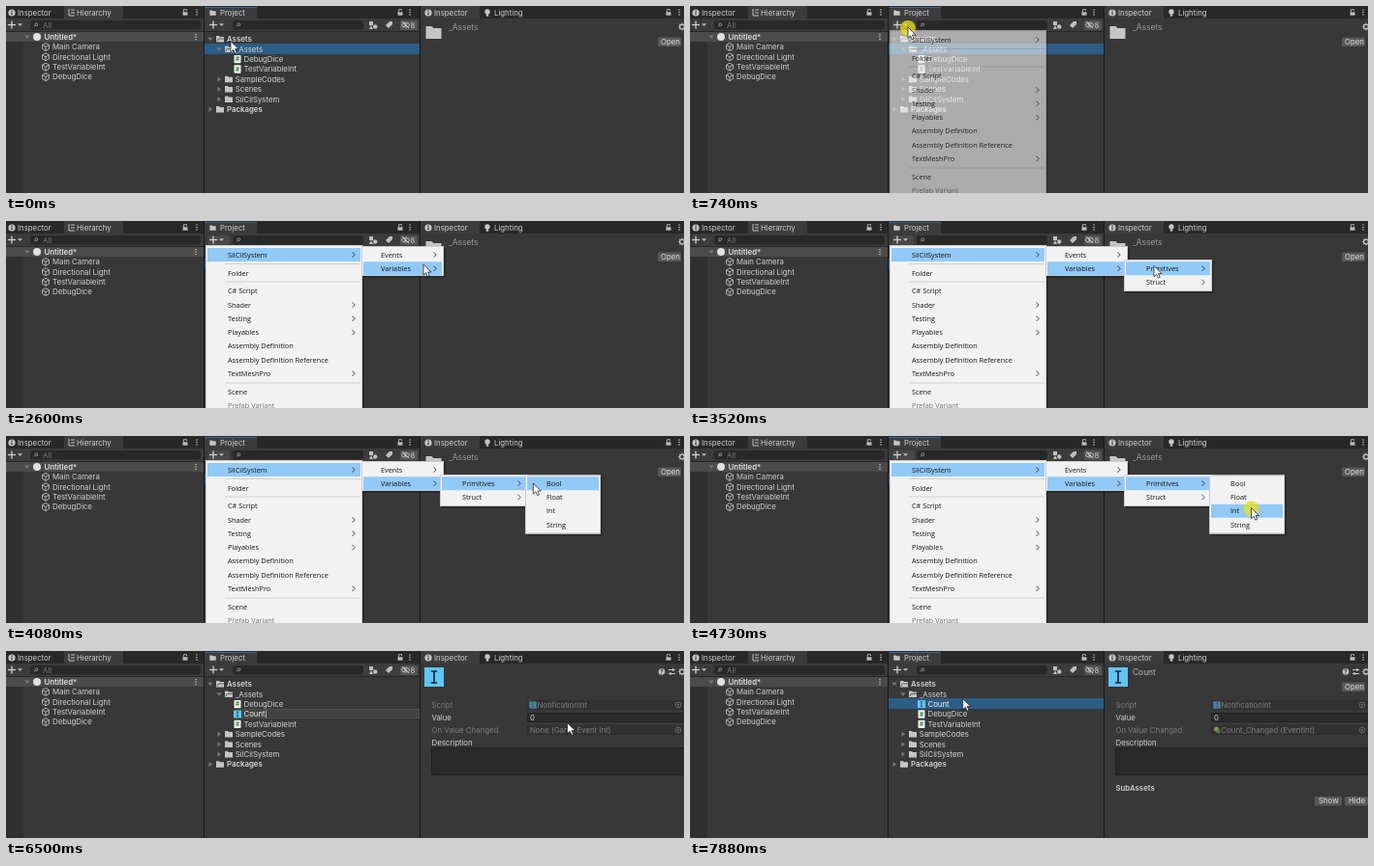
Write an HTML page with a canvas that moves like this. It is 700 px wide and 194 px high and loops after 8000 ms.

```html
<!DOCTYPE html>
<html lang="en">
<head>
<meta charset="utf-8">
<title>Creating a variable asset</title>
<style>
html, body { margin: 0; width: 100%; height: 100%; overflow: hidden; background: #383838; }
canvas { display: block; width: 700px; height: 194px; }
</style>
</head>
<body>
<canvas id="stage" width="700" height="194"></canvas>
<script>
const LOOP = 8000;
const UI = 'Inter, sans-serif';
const MENU = '"Open Sans", sans-serif';
const INK = '#d0d0d0';
const DIM = '#7c7c7c';
const screen = document.getElementById('stage').getContext('2d');
const layer = document.createElement('canvas');
layer.width = 700;
layer.height = 194;
const layerCtx = layer.getContext('2d');
let g = screen;

function box(x, y, w, h, color, radius = 0) {
  g.fillStyle = color;
  g.beginPath();
  g.roundRect(x, y, w, h, radius);
  g.fill();
}

function frame(x, y, w, h, color, radius = 0) {
  g.strokeStyle = color;
  g.lineWidth = 1;
  g.beginPath();
  g.roundRect(x + .5, y + .5, w - 1, h - 1, radius);
  g.stroke();
}

function text(str, x, y, color = INK, size = 7.8, weight = 400, family = UI) {
  g.font = `${weight} ${size}px ${family}`;
  g.textBaseline = 'alphabetic';
  g.fillStyle = color;
  g.fillText(str, x, y + size * .36);
}

function poly(points, color, filled = true, width = 1) {
  g.beginPath();
  points.forEach(([x, y], i) => i ? g.lineTo(x, y) : g.moveTo(x, y));
  if (filled) {
    g.fillStyle = color;
    g.fill();
  } else {
    g.strokeStyle = color;
    g.lineWidth = width;
    g.stroke();
  }
}

function disc(x, y, r, color) {
  g.fillStyle = color;
  g.beginPath();
  g.arc(x, y, r, 0, Math.PI * 2);
  g.fill();
}

function ring(x, y, r, color, width = .9) {
  g.strokeStyle = color;
  g.lineWidth = width;
  g.beginPath();
  g.arc(x, y, r, 0, Math.PI * 2);
  g.stroke();
}

function foldout(x, y, open) {
  poly(open ? [[x - 2.8, y - 1.5], [x + 2.8, y - 1.5], [x, y + 2]]
            : [[x - 1.5, y - 2.8], [x - 1.5, y + 2.8], [x + 2, y]], '#777');
}

function folder(x, y, s = 1, open = false) {
  poly([[x - 4 * s, y - 3.2 * s], [x - s, y - 3.2 * s], [x, y - 2.2 * s], [x + 4 * s, y - 2.2 * s],
        [x + 4 * s, y + 3.3 * s], [x - 4 * s, y + 3.3 * s]], '#c5c5c5');
  if (open) poly([[x - 3, y + 2.5], [x - 1.8, y - .3], [x + 4, y - .3]], '#484848', false, .8);
}

function cube(x, y) {
  const hex = Array.from({ length: 7 }, (_, i) => {
    const a = Math.PI / 6 + i * Math.PI / 3;
    return [x + 4 * Math.cos(a), y + 4 * Math.sin(a)];
  });
  poly(hex, '#c0c0c0', false, .9);
  poly([[x - 3.4, y - 2], [x, y], [x + 3.4, y - 2]], '#c0c0c0', false, .9);
  poly([[x, y], [x, y + 4]], '#c0c0c0', false, .9);
}

function scriptIcon(x, y) {
  box(x - 3.5, y - 4.2, 7, 8.4, '#f2f2f2', .8);
  text('#', x - 2, y, '#218a3a', 6.2, 700);
}

function intIcon(x, y, s, alpha = 1) {
  g.globalAlpha = alpha;
  box(x - s / 2, y - s / 2, s, s, '#62c5f7');
  const h = s * .3, w = s * .16;
  for (const side of [-h, h]) poly([[x - w, y + side], [x + w, y + side]], '#10202a', false, s * .07);
  poly([[x, y - h], [x, y + h]], '#10202a', false, s * .08);
  g.globalAlpha = 1;
}

function dots(x, y) {
  for (const d of [-2.5, 0, 2.5]) disc(x, y + d, .8, '#c0c0c0');
}

function lock(x, y) {
  box(x - 2.5, y - .2, 5, 3.4, '#bdbdbd');
  poly([[x - 1.6, y], [x - 1.6, y - 2.8], [x + 1.5, y - 2.8], [x + 1.5, y - 1.4]], '#bdbdbd', false, .9);
}

function infoIcon(x, y) {
  disc(x, y, 3.6, '#c6c6c6');
  box(x - .6, y - .6, 1.2, 2.8, '#333');
  box(x - .6, y - 2.4, 1.2, 1.1, '#333');
}

function search(x, y, w) {
  box(x, y, w, 9.5, '#282828', 3);
  ring(x + 6.3, y + 4.2, 1.4, '#aaa', .8);
  poly([[x + 5.3, y + 5.2], [x + 4, y + 6.5]], '#aaa', false, .8);
}

function addButton(x, y) {
  poly([[x - 4, y], [x + 4, y]], '#d0d0d0', false, 1.3);
  poly([[x, y - 4], [x, y + 4]], '#d0d0d0', false, 1.3);
  poly([[x + 6, y - 1.2], [x + 11, y - 1.2], [x + 8.5, y + 1.6]], '#bbb');
}

function gear(x, y) {
  ring(x, y, 2.4, '#c4c4c4', 1.3);
  for (let i = 0; i < 8; i++) {
    const a = i * Math.PI / 4;
    disc(x + 3.3 * Math.cos(a), y + 3.3 * Math.sin(a), .6, '#c4c4c4');
  }
}

function button(label, x, y, w, tx) {
  box(x, y, w, 9.5, '#585858', 1.5);
  text(label, tx, y + 4.6, '#e0e0e0');
}

function drawHierarchy() {
  box(0, 0, 204, 13, '#282828');
  box(60, 0, 61, 13, '#3c3c3c');
  infoIcon(6, 7);
  text('Inspector', 12, 7);
  poly([[65, 3], [65, 10], [67, 10]], '#c0c0c0', false);
  for (const y of [4, 7, 10]) poly([[67, y], [71, y]], '#c0c0c0', false);
  text('Hierarchy', 73, 7);
  lock(185, 6.5);
  dots(197, 6.5);
  box(0, 13, 204, 13, '#3c3c3c');
  addButton(6, 19.5);
  search(25, 15, 176);
  text('All', 38, 19.8, '#777');
  box(0, 26, 204, 1, '#272727');
  box(0, 27, 18, 167, '#303030');
  box(0, 27, 204, 10, '#4b4b4b');
  foldout(22, 32, true);
  disc(32, 32, 4, '#e0e0e0');
  text('Untitled*', 39.5, 32, '#dedede', 7.8, 600);
  dots(196, 32);
  ['Main Camera', 'Directional Light', 'TestVariableInt', 'DebugDice'].forEach((name, i) => {
    const y = 42.4 + i * 10.4;
    cube(41, y);
    text(name, 48, y);
  });
}

function drawProject(t) {
  box(205, 0, 222, 13, '#282828');
  box(205, 1, 54, 12, '#3c3c3c');
  box(205, 1, 54, 1, '#3b6994');
  folder(213.5, 7, .8);
  text('Project', 221, 7.2);
  lock(407, 6.5);
  dots(417, 6.5);
  box(205, 13, 222, 13, '#3c3c3c');
  if (t >= 470 && t < 4920) box(209, 15, 22, 10, '#484848', 1.5);
  addButton(214, 19.5);
  search(234, 15, 135);
  box(375, 16, 4, 4, '#c0c0c0');
  poly([[377, 20], [379, 24], [375, 24]], '#c0c0c0');
  disc(381.2, 21.5, 2.2, '#c0c0c0');
  poly([[392, 20], [396, 16], [399, 16], [399, 19], [395, 23]], '#c0c0c0');
  box(407, 15, 18, 10, '#545454', 1.5);
  g.strokeStyle = '#ccc';
  g.lineWidth = .9;
  g.beginPath();
  g.ellipse(412.5, 19.7, 4, 2.3, 0, 0, 7);
  g.stroke();
  disc(412.5, 19.7, 1.2, '#ccc');
  poly([[409, 16], [416, 23]], '#ccc', false);
  text('8', 417.5, 19.8, '#ccc');
  box(205, 26, 222, 1, '#272727');
  drawTree(t);
  box(204, 0, 1, 194, '#191919');
  box(427, 0, 1, 194, '#191919');
}

function drawTree(t) {
  const created = t >= 5020;
  const renamed = t >= 6960;
  const scripts = ['DebugDice', 'TestVariableInt'];
  if (created) scripts.splice(renamed ? 0 : 1, 0, 'Count');
  const rows = [
    ['Assets', 0, true], ['_Assets', 1, true], ...scripts.map(n => [n, 2]),
    ['SampleCodes', 1], ['Scenes', 1], ['SilCilSystem', 1], ['Packages', 0]
  ];
  rows.forEach(([name, depth, open], i) => {
    const y = 34.3 + i * 10.4;
    const fresh = name === 'Count';
    if (fresh && renamed || name === '_Assets' && !created) {
      box(205, Math.floor(y - 5.2), 222, 11, '#2c5d87');
    }
    if (depth < 2) {
      foldout(211 + depth * 9, y, open);
      folder(221 + depth * 9, y, 1, open);
      text(name, 228 + depth * 8.7, y, '#d6d6d6', 7.8, depth ? 400 : 600);
    } else if (fresh) {
      intIcon(239, y, 8);
      if (renamed) text(name, 245.5, y, '#f0f0f0');
      else drawRename(t, y);
    } else {
      scriptIcon(239, y);
      text(name, 245.5, y);
    }
  });
}

function drawRename(t, y) {
  const typed = [5940, 6030, 6120, 6320, 6500].filter(at => t >= at).length;
  const value = typed ? 'Count'.slice(0, typed) : 'NewVariable';
  const top = Math.floor(y - 5);
  box(244, top, 183, 10, '#424242');
  frame(244, top, 183, 10, '#505050');
  g.font = `400 7.8px ${UI}`;
  const width = g.measureText(value).width;
  if (!typed) box(245, y - 4, width + 1, 8, '#3a72b0');
  text(value, 245.5, y, '#f0f0f0');
  if (typed) box(246 + width, y - 4, .7, 8, '#ddd');
}

function field(y, disabled) {
  box(538, y - 5, 162, 10, disabled ? '#323232' : '#2a2a2a', 1.5);
  frame(538, y - 5, 163, 10, disabled ? '#2f2f2f' : '#222', 1.5);
  if (!disabled) return;
  ring(694, y, 2.8, '#777', .8);
  disc(694, y, 1, '#777');
}

function drawInspector(t) {
  const created = t >= 5020;
  const done = t >= 7060;
  box(428, 0, 272, 13, '#282828');
  box(428, 0, 61, 13, '#3c3c3c');
  infoIcon(436, 7);
  text('Inspector', 442, 7);
  disc(497, 6, 2.7, '#c6c6c6');
  box(495.8, 8.5, 2.4, 2.2, '#c6c6c6');
  text('Lighting', 504, 7);
  lock(684, 6.5);
  dots(695, 6.5);
  gear(698, 21.5);
  if (!created || done) button('Open', 673, 32.5, 24, 676);
  if (!created) {
    folder(441.5, 27.5, 2);
    text('_Assets', 457, 22.3, '#9a9a9a', 8.4);
    return;
  }
  intIcon(442, 27, 20);
  disc(677, 21.5, 3.3, '#c4c4c4');
  text('?', 675.2, 21.5, '#333', 6, 700);
  poly([[684, 19.5], [691, 19.5]], '#c4c4c4', false);
  poly([[684, 23.5], [691, 23.5]], '#c4c4c4', false);
  box(688, 18, 1.2, 3, '#c4c4c4');
  box(685.5, 22, 1.2, 3, '#c4c4c4');
  if (done) text('Count', 457, 22.3, '#b5b5b5', 8.4);

  text('Script', 439.5, 56, DIM);
  field(56, true);
  intIcon(544, 56, 7.5, .55);
  text('NotificationInt', 548.5, 56, DIM);
  text('Value', 439.5, 69);
  field(69, false);
  text('0', 541, 69);
  text('On Value Changed', 439.5, 82, DIM);
  field(82, true);
  if (done) {
    disc(543.5, 81, 2.5, '#a58c35');
    disc(545.5, 83.5, 2.1, '#4c8064');
    text('Count_Changed (EventInt)', 548.5, 82, DIM);
  } else {
    text('None (Game Event Int)', 541, 82, DIM);
  }
  text('Description', 439.5, 95);
  box(439, 100, 261, 29, '#2a2a2a', 1.5);
  frame(439, 100, 262, 29, '#202020', 1.5);
  if (!done) return;
  text('SubAssets', 439.5, 142.5, '#d0d0d0', 7.8, 600);
  button('Show', 645, 151, 28, 649);
  button('Hide', 676, 151, 24, 680);
}

const items = (names, y, arrow) => names.map((name, i) => ({ name, y: y + i * 14.3, arrow }));
const menus = [
  {
    x: 206, y: 25, w: 162, h: 175, tx: 229, opens: 740, from: .62, seps: [44.5, 63, 168],
    rows: [
      { name: 'SilCilSystem', y: 35, arrow: true }, { name: 'Folder', y: 54 },
      { name: 'C# Script', y: 72.5 },
      ...items(['Shader', 'Testing', 'Playables'], 87, true),
      ...items(['Assembly Definition', 'Assembly Definition Reference'], 129.7),
      { name: 'TextMeshPro', y: 158.3, arrow: true },
      { name: 'Scene', y: 177 }, { name: 'Prefab Variant', y: 191.3, off: true }
    ],
    pick: t => t >= 1220 ? 0 : -1
  },
  {
    x: 367, y: 26, w: 85, h: 31, tx: 387, opens: 1760, from: .33,
    rows: items(['Events', 'Variables'], 35, true),
    pick: t => t >= 2600 ? 1 : t >= 2280 ? 0 : -1
  },
  {
    x: 448, y: 40, w: 91, h: 33, tx: 471, opens: 2960, from: .4,
    rows: items(['Primitives', 'Struct'], 49.2, true),
    pick: t => t >= 3260 ? 0 : -1
  },
  {
    x: 536, y: 40.5, w: 78, h: 61, tx: 558, opens: 3700, from: .4,
    rows: items(['Bool', 'Float', 'Int', 'String'], 49.2),
    pick: (t, p) => p.x < 538 ? -1 : p.y < 56.3 ? 0 : p.y < 70.6 ? 1 : 2
  }
];

function drawMenu(menu, t, pointer) {
  const { x, y, w, h, tx } = menu;
  g = layerCtx;
  g.clearRect(0, 0, 700, 194);
  box(x + 2, y + 2, w, h, 'rgba(0,0,0,.25)');
  box(x, y, w, h, '#f2f2f2');
  frame(x, y, w, h, '#cccccc');
  for (const sy of menu.seps || []) box(x + 20, sy - .5, w - 22, 1, '#d2d2d2');
  const picked = menu.pick(t, pointer);
  menu.rows.forEach((row, i) => {
    if (i === picked) box(x + 2, row.y - 7, w - 4, 14, '#91c9f7');
    text(row.name, tx, row.y, row.off ? '#777' : '#151515', 7.3, 400, MENU);
    const ax = x + w - 9;
    if (row.arrow) poly([[ax - 1.5, row.y - 2.7], [ax + 1.2, row.y], [ax - 1.5, row.y + 2.7]], '#333', false, .9);
  });
  g = screen;
  g.globalAlpha = t >= 4920 ? .4 : t < menu.opens + 100 ? menu.from : 1;
  g.drawImage(layer, 0, 0);
  g.globalAlpha = 1;
}

// Pointer stops: time, x, y
const path = [
  [0, 232, 36.5], [60, 232, 36.5], [560, 225, 22], [1050, 225, 22], [1480, 237.5, 31.5],
  [1800, 237.5, 31.5], [2500, 431, 40], [2640, 431, 46], [3040, 431, 46], [3520, 479, 46.5],
  [3780, 479, 46.5], [4100, 545, 49], [4450, 578.5, 73], [4550, 579.5, 74.5],
  [7520, 579.5, 74.5], [7880, 281.7, 49.5], [8000, 281.7, 49.5]
];

function pointerAt(t) {
  const i = path.findIndex(stop => stop[0] > t);
  const [t0, x0, y0] = path[i - 1];
  const [t1, x1, y1] = path[i];
  const u = (t - t0) / (t1 - t0);
  const k = u * u * (3 - 2 * u);
  return { x: x0 + (x1 - x0) * k, y: y0 + (y1 - y0) * k };
}

function drawPointer({ x, y }) {
  const shape = [[0, 0], [0, 11.2], [2.6, 8.8], [4.4, 12.7], [6.2, 11.9], [4.5, 8.1], [8, 8.1], [0, 0]]
    .map(([dx, dy]) => [x + dx, y + dy]);
  poly(shape, '#fff');
  poly(shape, '#111', false, .7);
}

function render(t) {
  const pointer = pointerAt(t);
  box(0, 0, 700, 194, '#383838');
  drawHierarchy();
  drawInspector(t);
  drawProject(t);
  for (const menu of menus) {
    if (t >= menu.opens && t < 5020) drawMenu(menu, t, pointer);
  }
  if (t >= 740 && t < 840 || t >= 4730 && t < 4920) {
    disc(pointer.x, pointer.y + 1, 8, 'rgba(232,226,20,.75)');
  }
  drawPointer(pointer);
}

const start = performance.now();
function tick() {
  render((performance.now() - start) % LOOP);
  requestAnimationFrame(tick);
}
tick();
</script>
</body>
</html>
```
